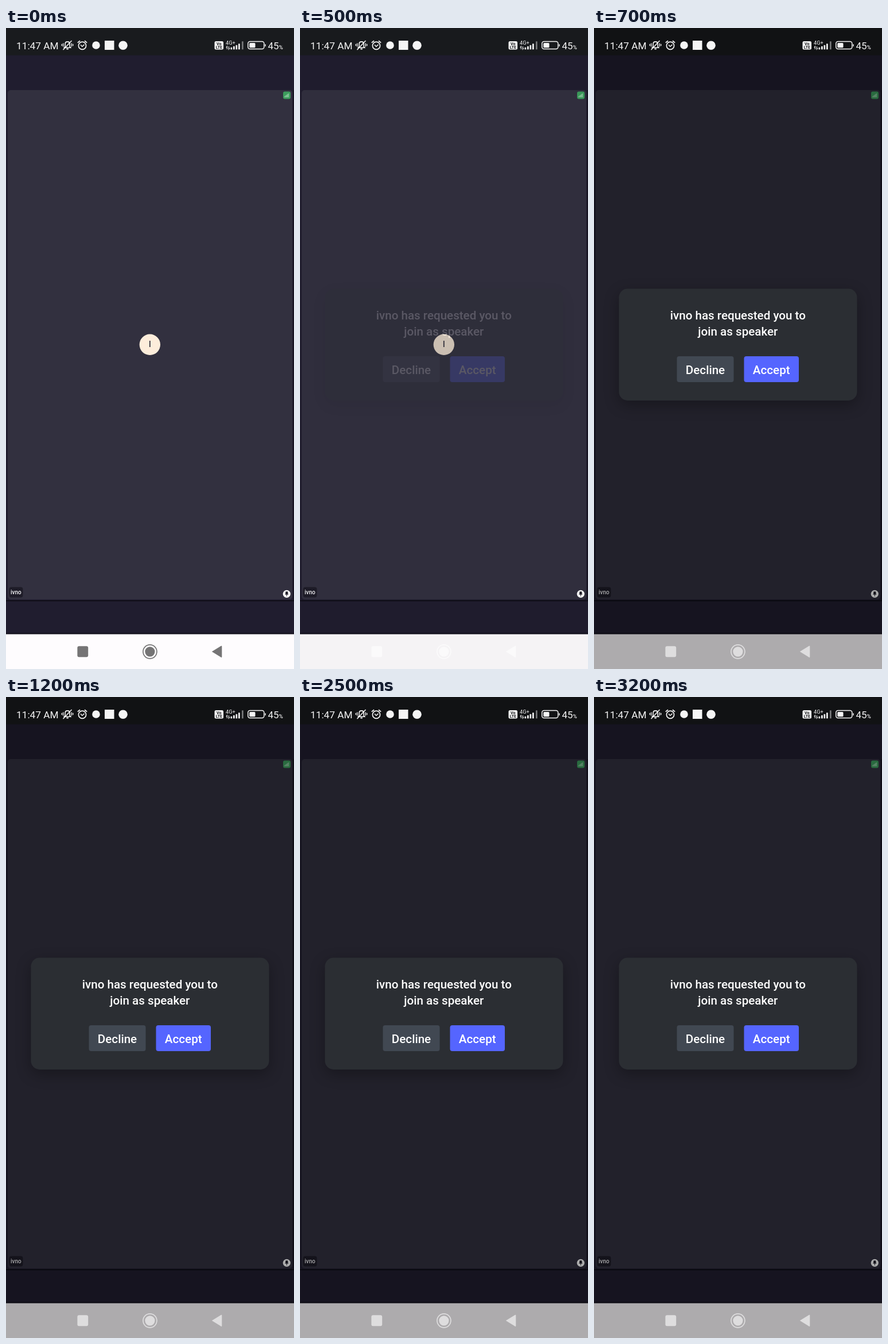
These frames come from a looping animation (502x1115 px, 3.3 s). An HTML page with a canvas:

```html
<!DOCTYPE html>
<html lang="en">
<head>
<meta charset="utf-8">
<title>Speaker request</title>
<style>
  html, body { margin: 0; width: 100%; height: 100%; overflow: hidden; background: #201d2f; }
  canvas { display: block; }
</style>
</head>
<body>
<canvas id="stage" width="502" height="1115"></canvas>
<script>
const W = 502, H = 1115, LOOP = 3300, STEP = 100;
const NAV_TOP = 1054.5;
const NAME = 'ivno';
const FONT = 'Roboto, "Noto Sans", sans-serif';
const view = document.getElementById('stage').getContext('2d');

// Values per 100 ms step; the last one holds until the loop restarts.
const NAV_DARK = [0.54, 0.37, 0.16, 0];
const DIM = [0, 0, 0, 0, 0, 0.035, 0.205, 0.32];
const CARD_ALPHA = [0, 0, 0, 0, 0, 0.2, 0.92, 1];
const at = (list, step) => list[Math.min(step, list.length - 1)];

function box(c, x, y, w, h, r, fill) {
  c.beginPath();
  c.roundRect(x, y, w, h, r);
  c.fillStyle = fill;
  c.fill();
}

function disc(c, x, y, r, fill) {
  c.beginPath();
  c.arc(x, y, r, 0, Math.PI * 2);
  c.fillStyle = fill;
  c.fill();
}

function text(c, str, x, y, size, fill, weight = 500, align = 'left') {
  c.font = `${weight} ${size}px ${FONT}`;
  c.textAlign = align;
  c.fillStyle = fill;
  c.fillText(str, x, y);
}

function line(c, width, color, ...pts) {
  c.beginPath();
  for (let i = 0; i < pts.length; i += 2) c.lineTo(pts[i], pts[i + 1]);
  c.lineWidth = width;
  c.strokeStyle = color;
  c.stroke();
}

function drawCall(c) {
  c.fillStyle = '#201d2f';
  c.fillRect(0, 0, W, H);
  c.fillStyle = '#191b1e';
  c.fillRect(0, 0, W, 47.5);
  box(c, 3, 108, 496, 886, 5, '#32303f');
  c.fillStyle = '#08070d';
  c.fillRect(0, 995.7, W, 1.3);
  c.fillStyle = '#15131f';
  c.fillRect(500.5, 108, 1.5, 888);
  c.fillRect(0, 1052, W, 2.5);

  // Signal badge
  box(c, 483, 110.5, 13, 13, 3, '#3c9c5c');
  c.fillStyle = '#a3d3b2';
  for (let i = 0; i < 4; i++) c.fillRect(485.5 + i * 2, 118.5 - i * 1.5, 1.3, 2 + i * 1.5);

  // Avatar
  disc(c, 250.8, 550.8, 18.2, '#fdeddb');
  text(c, 'I', 250.8, 555.4, 14.5, '#35333f', 500, 'center');

  // Name tag and pin
  box(c, 5.5, 972.5, 24, 18, 4, '#1e1c28');
  text(c, NAME, 8, 984.5, 10, '#f4f4f6');
  disc(c, 489.3, 984.3, 6.6, '#ffffff');
  box(c, 487.2, 980.3, 4.2, 5, 1, '#1e1c28');
  c.fillRect(486.4, 984.3, 5.8, 1.2);
  c.fillRect(488.8, 985, 1, 3.6);

  c.fillStyle = '#fefcfe';
  c.fillRect(0, NAV_TOP, W, H - NAV_TOP);
}

function drawCard(c) {
  c.save();
  c.shadowColor = 'rgba(0,0,0,0.3)';
  c.shadowBlur = 26;
  c.shadowOffsetY = 8;
  box(c, 43.5, 453.5, 415, 194.5, 15, '#2b2e33');
  c.restore();
  const label = (str, x, y) => text(c, str, x, y, 20.6, '#ffffff', 500, 'center');
  label(`${NAME} has requested you to`, 250.8, 507.3);
  label('join as speaker', 250.8, 534.7);
  box(c, 144.5, 571, 99, 45, 4, '#414852');
  label('Decline', 194, 601.7);
  box(c, 261.5, 571, 95.5, 45, 4, '#5565ff');
  label('Accept', 309.2, 601.7);
}

function drawMutedBell(c) {
  const white = '#f5f5f5';
  c.beginPath();
  c.moveTo(101.5, 34.3);
  c.lineTo(103, 32.5);
  c.lineTo(103, 28.5);
  c.bezierCurveTo(103, 22.3, 111.2, 22.3, 111.2, 28.5);
  c.lineTo(111.2, 32.5);
  c.lineTo(112.7, 34.3);
  c.closePath();
  c.lineWidth = 1.6;
  c.strokeStyle = white;
  c.stroke();
  box(c, 105.2, 35.6, 3.8, 1.8, 0.9, white);
  line(c, 1.6, white, 114.5, 22, 99.5, 38);
  for (const side of [-1, 1]) {
    line(c, 1.4, white, 107 + side * 7.3, 26.5, 107 + side * 7.3, 32.5);
    line(c, 1.4, white, 107 + side * 9.7, 27.8, 107 + side * 9.7, 31.2);
  }
}

function drawAlarm(c) {
  const white = '#f5f5f5';
  c.beginPath();
  c.arc(133, 30.8, 6.6, 0, Math.PI * 2);
  c.lineWidth = 1.7;
  c.strokeStyle = white;
  c.stroke();
  line(c, 1.8, white, 124.8, 25.6, 129, 22.2);
  line(c, 1.8, white, 141.2, 25.6, 137, 22.2);
  line(c, 1.5, white, 130, 29.3, 132.8, 32.2, 136.5, 28.9);
}

function drawStatus(c) {
  const white = '#f5f5f5';
  text(c, '11:47 AM', 18, 36.8, 17.3, white, 400);
  drawMutedBell(c);
  drawAlarm(c);
  disc(c, 157, 30, 6.8, white);
  c.fillRect(172, 22, 16.5, 16);
  disc(c, 204, 30.2, 7.8, white);

  box(c, 363.5, 23, 15.5, 14.5, 2.5, white);
  text(c, 'Vo', 371.2, 30, 7, '#17181b', 700, 'center');
  text(c, 'LTE', 371.2, 36.4, 6.8, '#17181b', 700, 'center');

  text(c, '4G+', 383, 28.6, 9.2, white, 400);
  line(c, 1.1, white, 385.3, 37, 385.3, 32, 383.8, 34);
  line(c, 1.1, white, 388.3, 32, 388.3, 37, 389.8, 35);
  for (let i = 0; i < 5; i++) {
    const tall = [3.5, 5.5, 7.5, 10, 14][i];
    c.fillStyle = i === 4 ? '#77787a' : white;
    c.fillRect([391.5, 396, 400.5, 405, 411][i], 37.3 - tall, 2.7, tall);
  }

  c.beginPath();
  c.roundRect(421.8, 23.6, 28, 13, 3.5);
  c.lineWidth = 1.5;
  c.strokeStyle = white;
  c.stroke();
  box(c, 424.3, 26, 10.2, 8.2, 1.5, white);
  box(c, 451.3, 28, 1.5, 4.2, 0.7, white);
  text(c, '45', 456.5, 36.8, 17, white, 400);
  text(c, '%', 475.8, 36.8, 9.6, white, 500);
}

function drawNavIcons(c, color) {
  box(c, 124.4, 1075.3, 18.8, 19, 3, color);
  c.beginPath();
  c.arc(250.9, 1084.8, 12, 0, Math.PI * 2);
  c.lineWidth = 1.7;
  c.strokeStyle = color;
  c.stroke();
  disc(c, 250.9, 1084.8, 8.6, color);
  c.beginPath();
  c.moveTo(358.8, 1084.8);
  c.lineTo(375, 1074.8);
  c.quadraticCurveTo(376.3, 1074.2, 376.3, 1075.8);
  c.lineTo(376.3, 1093.8);
  c.quadraticCurveTo(376.3, 1095.4, 375, 1094.8);
  c.closePath();
  c.fill();
}

// The card fades as one group, so it is painted on its own layer.
const cardLayer = document.createElement('canvas');
cardLayer.width = W;
cardLayer.height = H;
const cardView = cardLayer.getContext('2d');

function render(ms) {
  const step = Math.floor((ms % LOOP) / STEP);
  drawCall(view);
  view.fillStyle = `rgba(0,0,0,${at(DIM, step)})`;
  view.fillRect(0, 0, W, H);

  const alpha = at(CARD_ALPHA, step);
  if (alpha > 0) {
    cardView.clearRect(0, 0, W, H);
    drawCard(cardView);
    view.globalAlpha = alpha;
    view.drawImage(cardLayer, 0, 0);
    view.globalAlpha = 1;
  }

  drawStatus(view);
  const dark = at(NAV_DARK, step);
  drawNavIcons(view, dark > 0 ? `rgba(0,0,0,${dark})` : 'rgba(255,255,255,0.6)');
}

const start = performance.now();
function tick() {
  render(performance.now() - start);
  requestAnimationFrame(tick);
}
tick();
</script>
</body>
</html>
```
